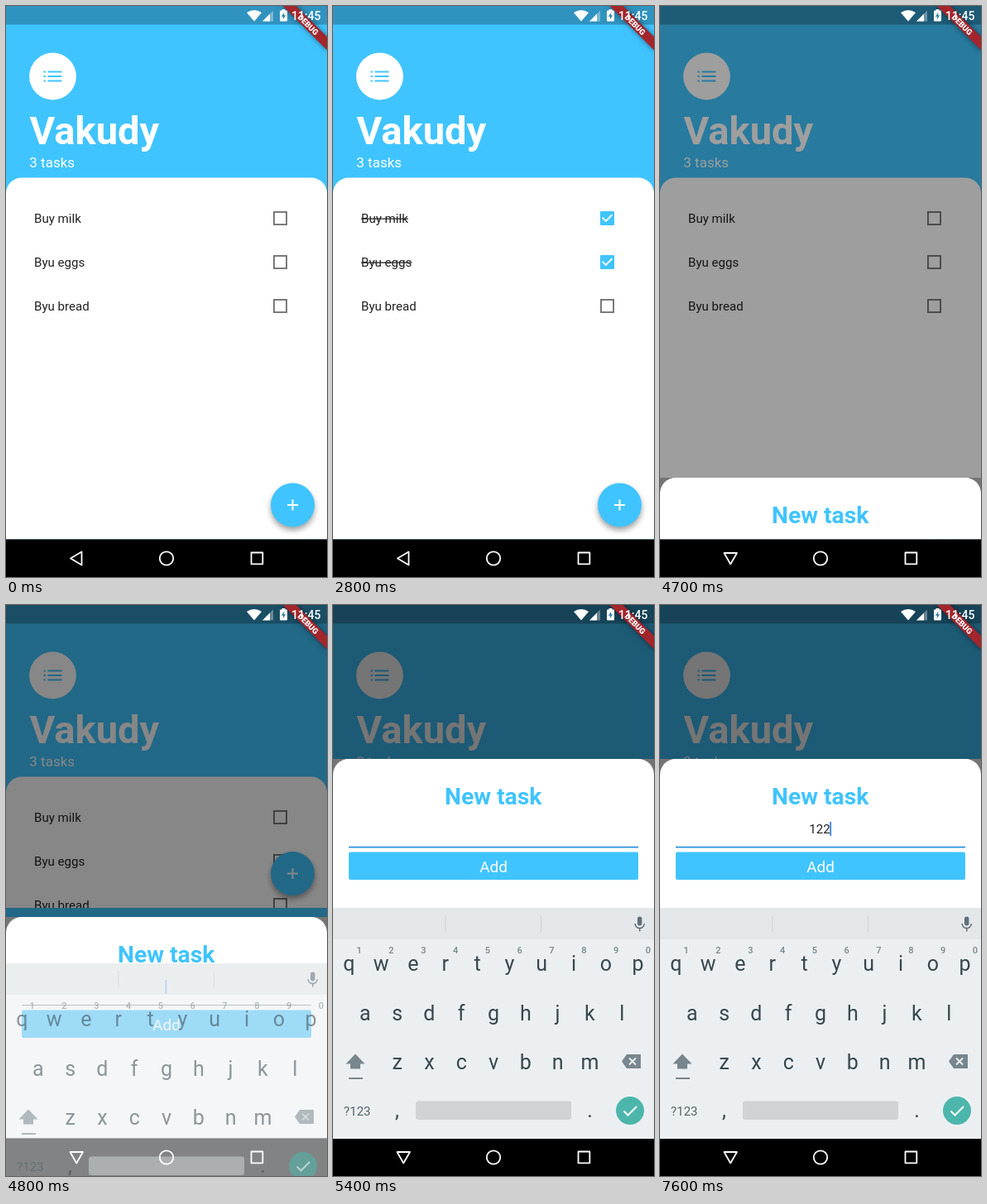
Write an HTML page with a canvas that moves like this. It is 388 by 690 pixels and loops after 8000 ms.

```html
<!DOCTYPE html>
<html lang="en">
<head>
<meta charset="utf-8">
<title>Task list</title>
<style>
html, body { margin: 0; width: 100%; height: 100%; overflow: hidden; background: #000; }
canvas { display: block; width: 388px; height: 690px; }
</style>
</head>
<body>
<canvas></canvas>
<script>
const W = 388, H = 690, LOOP = 8000, STEP = 100;
const NAV = 644.5, KEYS = 366;
const BLUE = '#40c4ff', WHITE = '#fff', INK = '#37474f', PALE = '#eceff1', ICON = '#78868e';
const canvas = document.querySelector('canvas');
const ratio = window.devicePixelRatio || 1;
canvas.width = W * ratio;
canvas.height = H * ratio;
const c = canvas.getContext('2d');
c.scale(ratio, ratio);

const clamp = v => Math.max(0, Math.min(1, v));

// Linear interpolation through [time, value] points.
function track(t, points) {
  let [t0, v0] = points[0];
  for (const [t1, v1] of points) {
    if (t < t1) return v0 + (v1 - v0) * clamp((t - t0) / (t1 - t0));
    [t0, v0] = [t1, v1];
  }
  return v0;
}

function rect(x, y, w, h, color, radius = 0) {
  c.fillStyle = color;
  c.beginPath();
  c.roundRect(x, y, w, h, radius);
  c.fill();
}

function disc(x, y, r, color) {
  c.fillStyle = color;
  c.beginPath();
  c.arc(x, y, r, 0, 7);
  c.fill();
}

function trace(points, closed) {
  c.beginPath();
  for (let i = 0; i < points.length; i += 2) c.lineTo(points[i], points[i + 1]);
  if (closed) c.closePath();
}

function poly(color, ...points) {
  trace(points, true);
  c.fillStyle = color;
  c.fill();
}

function line(color, width, ...points) {
  trace(points);
  c.strokeStyle = color;
  c.lineWidth = width;
  c.stroke();
}

function text(s, x, y, size, color, weight = 400, align = 'center') {
  c.font = `${weight} ${size}px Roboto, sans-serif`;
  c.textAlign = align;
  c.fillStyle = color;
  c.fillText(s, x, y);
  return c.measureText(s).width;
}

function shadowed(blur, offset, alpha, draw) {
  c.save();
  c.shadowColor = `rgba(0,0,0,${alpha})`;
  c.shadowBlur = blur * ratio;
  c.shadowOffsetY = offset * ratio;
  draw();
  c.restore();
}

function checkbox(x, y, amount) {
  const s = 17;
  const fill = clamp(amount * 2), tick = clamp(amount * 2 - 1);
  if (fill < 1) {
    const w = 1.9 + fill * 6.6;
    c.strokeStyle = fill > 0 ? BLUE : '#757575';
    c.lineWidth = w;
    c.strokeRect(x + w / 2, y + w / 2, s - w, s - w);
    return;
  }
  rect(x, y, s, s, BLUE, 1);
  if (!tick) return;
  const a = clamp(tick * 2), b = clamp(tick * 2 - 1);
  const points = [.15, .45, .15 + .25 * a, .45 + .25 * a];
  if (b) points.push(.4 + .45 * b, .7 - .45 * b);
  line(WHITE, 1.9, ...points.map((v, i) => v * s + (i % 2 ? y : x)));
}

const tasks = [
  { name: 'Buy milk', on: 1900, off: 3500 },
  { name: 'Byu eggs', on: 2600, off: 3900 },
  { name: 'Byu bread', on: Infinity, off: Infinity }
];

function drawTask({ name, on, off }, row, t) {
  const y = 256.5 + row * 53;
  const done = t >= on && t < off;
  const w = text(name, 34, y + 5.5, 15.1, '#212121', 400, 'left');
  if (done) rect(34, y + .1, w, 1.1, '#212121');
  const amount = t < on ? 0 : t < off ? clamp((t - on + 50) / 200) : 1 - clamp((t - off + 50) / 200);
  checkbox(323, y - 8.5, amount);
}

function drawPage(t) {
  const bottom = t >= 4800 ? KEYS : NAV;
  rect(0, 0, W, NAV, BLUE);
  disc(56.5, 85, 28.4, WHITE);
  for (const y of [79.5, 85, 90.5]) {
    rect(45.5, y - 1, 2.4, 2, BLUE);
    rect(50.5, y - 1, 17, 2, BLUE);
  }
  text('Vakudy', 28.5, 166.5, 47.1, WHITE, 700, 'left');
  text('3 tasks', 28.3, 194.5, 17, WHITE, 400, 'left');

  c.save();
  c.beginPath();
  c.rect(0, 0, W, bottom);
  c.clip();
  rect(0, 207.5, W, 460, WHITE, 19);
  tasks.forEach((task, row) => drawTask(task, row, t));
  c.restore();

  const y = bottom - 41.5, pressed = t >= 4600 && t < 4800;
  shadowed(pressed ? 12 : 7, pressed ? 6 : 4, .38, () => disc(346.5, y, 26.5, pressed ? '#53bff4' : BLUE));
  rect(340, y - 1, 13, 2, WHITE);
  rect(345.5, y - 6.5, 2, 13, WHITE);
}

function cursorOn(t) {
  return t >= 4800 && t < 5200 || t >= 5600 && t < 6000 || t >= 6700;
}

function drawSheet(t) {
  const top = track(t, [[4600, 644], [4700, 570], [4800, 377], [4900, 215], [5000, 186]]);
  c.save();
  c.beginPath();
  c.rect(0, 0, W, NAV);
  c.clip();
  c.translate(0, top);
  rect(0, 0, W, 30, '#757575');
  rect(0, 0, W, 500, WHITE, 19);
  text('New task', 193.7, 55, 28.3, BLUE, 700);

  const typed = t < 7200 ? '' : t < 7300 ? '1' : t < 7600 ? '12' : '122';
  const w = text(typed, 193, 90, 15.1, '#212121');
  if (cursorOn(t)) rect(193 + w / 2 - .5, 76, 1.9, 17, '#4285f4');

  if (t < 4900) rect(19, 106, 350, 1, '#888');
  else rect(19, 105.7, 350, 1.9, '#2a92dd');
  rect(19, 112.5, 350, 33.5, BLUE, 2);
  text('Add', 194, 136.5, 18.9, WHITE);
  c.restore();
}

function drawKeyboard(t) {
  c.save();
  c.globalAlpha = track(t, [[4700, 0], [4800, .55], [4900, .95], [5000, 1]]);
  c.translate(0, track(t, [[4700, 133], [4800, 67], [4900, 12], [5000, 0]]));
  rect(0, KEYS, W, 279, PALE);
  rect(0, KEYS, W, 38, '#e4e7e9');
  rect(135.5, 375, 1, 21, '#d0d4d7');
  rect(251, 375, 1, 21, '#d0d4d7');

  rect(368, 376.5, 5.4, 11, '#607078', 2.7);
  c.beginPath();
  c.arc(370.7, 385, 5.6, 0, Math.PI);
  c.strokeStyle = '#607078';
  c.lineWidth = 1.5;
  c.stroke();
  rect(370, 390.5, 1.5, 4, '#607078');

  const pitch = 38.8;
  const rows = [['qwertyuiop', 19.4, 442], ['asdfghjkl', 38.8, 501.5], ['zxcvbnm', 77.6, 560.5]];
  for (const [letters, x, y] of rows)
    [...letters].forEach((letter, i) => text(letter, x + i * pitch, y, 25, INK));
  [...'1234567890'].forEach((digit, i) => text(digit, 31.7 + i * pitch, 420.5, 11, ICON, 500));

  poly(ICON, 27, 542.5, 38.5, 554.5, 33, 554.5, 33, 560.5, 21, 560.5, 21, 554.5, 15.5, 554.5);
  rect(19, 571, 17, 2, ICON);
  poly(ICON, 349, 551.5, 355, 543, 372, 543, 372, 560, 355, 560);
  line(PALE, 1.8, 358, 547.5, 366, 555.5);
  line(PALE, 1.8, 366, 547.5, 358, 555.5);

  text('?123', 29.3, 616.5, 15, '#53636b');
  text(',', 77.5, 618.5, 25, INK);
  rect(100, 599.5, 188, 22.5, '#d0d3d6', 3);
  text('.', 310.5, 618.5, 25, INK);
  disc(359, 611, 17, '#4db6ac');
  line(WHITE, 2, 351.5, 611.5, 356.5, 616.5, 367, 606);
  c.restore();
}

function drawBanner() {
  c.save();
  c.translate(W, 0);
  c.rotate(Math.PI / 4);
  shadowed(6, 0, .5, () => rect(-37.7, 26.4, 75.4, 11.3, '#a3262d'));
  text('DEBUG', 0, 35.5, 9.6, WHITE, 900);
  c.restore();
}

function drawStatus() {
  c.fillStyle = WHITE;
  c.beginPath();
  c.moveTo(300, 18.5);
  c.lineTo(291, 8);
  c.quadraticCurveTo(300, 2, 309, 8);
  c.fill();
  poly('rgba(255,255,255,.35)', 310, 18.5, 323, 5.5, 323, 18.5);
  poly(WHITE, 310, 18.5, 319, 9.5, 319, 18.5);
  rect(331, 5.5, 9, 13, WHITE, 1);
  rect(333.5, 4, 4, 2, WHITE);
  poly('#2d7fa6', 336.5, 7.5, 332.8, 12.8, 335, 12.8, 334.6, 16.5, 338.2, 11.2, 336, 11.2);
  text('11:45', 380.5, 16.8, 14, WHITE, 500, 'right');
}

function drawNav(keyboardOpen) {
  c.lineJoin = 'round';
  c.strokeStyle = WHITE;
  c.lineWidth = 1.8;
  trace(keyboardOpen ? [77.5, 661, 93, 661, 85.2, 674.5] : [78, 667.5, 91.5, 659.5, 91.5, 675.5], true);
  c.stroke();
  c.beginPath();
  c.arc(194, 667.5, 8.2, 0, 7);
  c.stroke();
  c.strokeRect(296.5, 660.5, 13.8, 13.8);
  c.lineJoin = 'miter';
}

function draw(t) {
  const open = t >= 4700;
  drawPage(t);
  rect(0, 0, W, 22.5, 'rgba(0,0,0,.25)');
  const shade = track(t, [[4600, 0], [4700, .38], [4800, .47], [5000, .54]]);
  rect(0, 0, W, NAV, `rgba(0,0,0,${shade})`);
  if (open) drawSheet(t);
  drawBanner();
  rect(0, NAV, W, H - NAV, '#000');
  if (open) drawKeyboard(t);
  drawStatus();
  drawNav(open);
}

const start = performance.now();
function frame() {
  const t = (performance.now() - start) % LOOP;
  draw(Math.floor(t / STEP) * STEP);
  requestAnimationFrame(frame);
}
frame();
</script>
</body>
</html>
```
